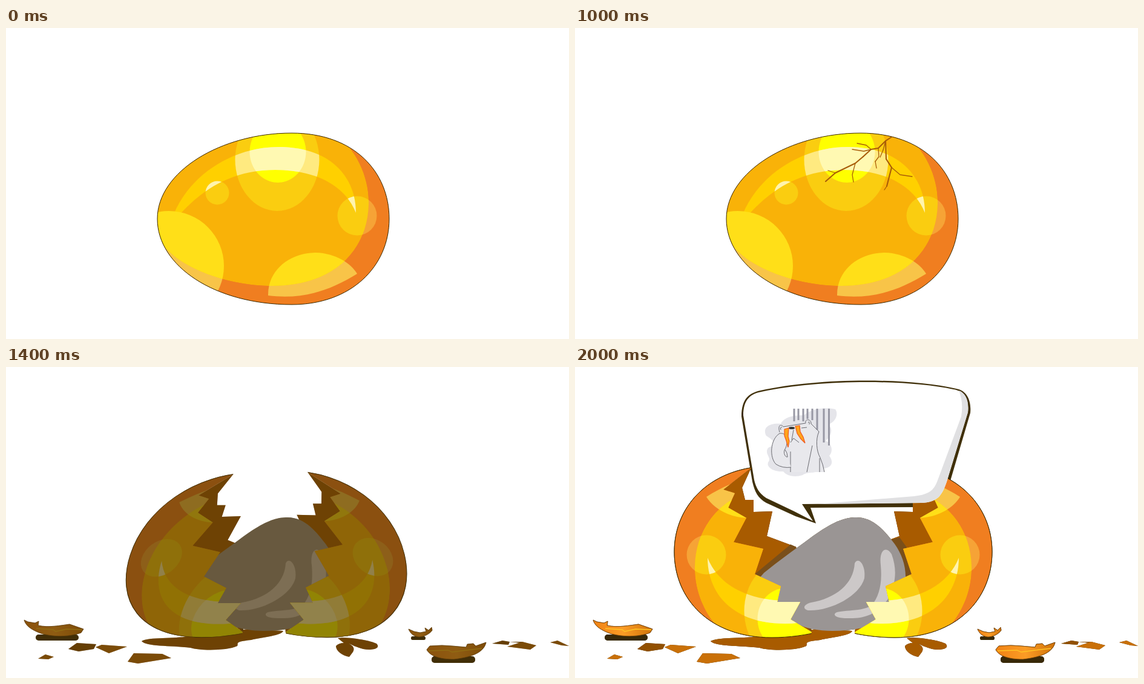
An HTML page that plays this animation: 930 px wide and 515 px high, repeating every 2.2 s.

```html
<!DOCTYPE html>
<html lang="en">
<head>
<meta charset="utf-8">
<title>Hatching egg</title>
<style>
html, body { margin: 0; width: 100%; height: 100%; overflow: hidden; background: #fff; }
svg { display: block; width: 100%; height: 100%; }
.crack path { fill: none; stroke: #a85c08; stroke-width: 1.3; stroke-linejoin: round; stroke-linecap: round; }
.crack .main { stroke-width: 2.1; }
.edge { fill: none; stroke: #3a2800; stroke-width: 1; }
</style>
</head>
<body>
<svg viewBox="0 0 930 515">
<defs>
  <filter id="silhouette" color-interpolation-filters="sRGB">
    <feFlood flood-color="#493207"/>
    <feComposite in2="SourceAlpha" operator="in"/>
  </filter>
  <linearGradient id="shard" x2="1">
    <stop offset="0" stop-color="#f08214"/><stop offset=".5" stop-color="#fb9c26"/><stop offset="1" stop-color="#cf7208"/>
  </linearGradient>

  <!-- painted egg -->
  <path id="eggShape" d="M250 316C250 238 355 174 472 174C575 174 633 238 633 316C633 395 570 458 472 458C345 458 250 394 250 316Z"/>
  <path id="eggLight" d="M565 195C590 225 600 262 599 292C597 370 540 427 440 427C365 427 290 397 262 362L200 300V150H540Z"/>
  <path id="eggBand" d="M270 330C290 250 370 197 450 197C540 197 578 250 578 306C560 260 510 235 445 235C370 235 315 270 270 330Z"/>
  <ellipse id="eggGlow" cx="448" cy="218" rx="69.5" ry="85"/>
  <ellipse id="eggCore" cx="449" cy="205" rx="46.5" ry="51"/>
  <g id="eggSpots">
    <circle cx="269" cy="394" r="91"/>
    <path d="M433 443C432 400 470 372 512 372C545 373 570 390 580 407C535 435 490 450 433 443Z"/>
  </g>
  <g id="eggDots"><circle cx="349" cy="273" r="19.5"/><circle cx="580" cy="311" r="32.5"/></g>
  <clipPath id="inEgg"><use href="#eggShape"/></clipPath>
  <clipPath id="inLight"><use href="#eggLight"/></clipPath>
  <clipPath id="inGlow"><use href="#eggGlow"/></clipPath>
  <clipPath id="inCore"><use href="#eggCore"/></clipPath>
  <clipPath id="inDots"><circle cx="349" cy="273" r="19.5"/><circle cx="580" cy="311" r="32.5"/></clipPath>
  <g id="paintedEgg">
    <g clip-path="url(#inEgg)">
      <path fill="#f07e20" d="M240 160H640V470H240Z"/>
      <use href="#eggSpots" fill="#f8c448"/>
      <use href="#eggDots" fill="#f6a336"/>
      <g clip-path="url(#inLight)">
        <use href="#eggLight" fill="#f9b208"/>
        <use href="#eggBand" fill="#ffd000"/>
        <use href="#eggGlow" fill="#facd10"/>
        <use href="#eggCore" fill="#ff0"/>
        <use href="#eggBand" fill="#ffea80" clip-path="url(#inGlow)"/>
        <use href="#eggBand" fill="#fff9b2" clip-path="url(#inCore)"/>
        <use href="#eggDots" fill="#facd10"/>
        <use href="#eggBand" fill="#fff4ae" clip-path="url(#inDots)"/>
        <use href="#eggSpots" fill="#ffdf18"/>
      </g>
    </g>
    <use href="#eggShape" class="edge"/>
  </g>

  <!-- left half of the broken shell: the egg turned upside down and cut; mirrored for the right half -->
  <clipPath id="jagged">
    <path d="M291 160V167L245 203 264 209 253 233 283 250 262 290 311 301 297 343 340 363 334 389 372 389 356 418 391 439V455H150V160Z"/>
  </clipPath>
  <path id="back" fill="#a85b00" d="M291 167L276 200 281 220H295V240L326 239 317 280 365 298 391 439 330 400 262 290 245 203Z"/>
  <g id="front" clip-path="url(#jagged)"><use href="#paintedEgg" transform="rotate(180 398.5 311)"/></g>

  <g id="scene">
    <g fill="#a85b00">
      <path d="M224 454C235 447 280 450 300 446L400 434 458 437C455 445 425 447 405 452C375 455 385 458 382 462C365 470 320 470 305 465C270 461 232 463 224 454Z"/>
      <path d="M548 449C560 446 600 452 612 458C620 466 605 470 590 467C578 464 572 460 566 458C575 462 576 467 573 472L567 480C555 478 545 470 545 462Q550 457 558 457Z"/>
      <path d="M103 467L117 457 149 459 145 467 120 471ZM803 458L820 453 832 455 830 460ZM832 455L853 455 852 457Z" fill="#925000"/>
      <path d="M148 464L158 460 200 463 170 474ZM53 483L65 476 79 480 70 484ZM201 488L211 474 258 475 273 482 218 491ZM828 463L853 455 876 461 866 468ZM899 456L911 453 930 462 918 461Z" fill="#c97008"/>
    </g>
    <g fill="#382908">
      <rect x="49" y="443" width="71" height="10" rx="5"/>
      <rect x="669" y="446" width="24" height="6" rx="3"/>
      <rect x="703" y="479" width="72" height="11" rx="5"/>
    </g>
    <g fill="url(#shard)" stroke="#7a4408" stroke-width=".8">
      <path d="M30 419L36 422 48 424 54 421 53 428C70 432 90 428 105 426L128 434 124 440C100 449 70 446 55 440C45 436 33 430 30 419Z"/>
      <path d="M665 434L674 438 684 440 694 438 692 432 698 436 703 431 704 436C700 442 690 447 682 447C673 446 668 441 665 434Z"/>
      <path d="M695 468L700 462 720 461 737 462 760 464 762 459 772 458 776 462 793 456C790 470 775 480 740 484C715 484 700 478 695 468Z"/>
      <path d="M50 433L78 435 82 438 100 434 126 435M698 470L730 469 737 472 760 469 786 466" fill="none" stroke="#ffc524" stroke-width="1.3"/>
    </g>
    <g class="left">
      <use href="#back"/><path fill="#7a4f1a" d="M356 294L365 298 391 439 297 343Z"/>
    </g>
    <g class="right">
      <use href="#back" transform="matrix(-1 0 0 1 853 0)"/><path fill="#7a4f1a" d="M522 286L536 282 549 300 557 342 530 370Z"/>
    </g>
    <path fill="#9a9594" d="M300 355L312 341C335 322 362 303 385 286C425 256 445 249 465 249C495 249 514 275 528 293C540 310 547 330 546 352C545 410 500 437 425 437C380 437 340 420 330 390Z"/>
    <g fill="#ccc8c8">
      <path d="M462 325C468 313 481 328 478 350C470 380 420 405 385 403C375 400 378 393 390 390C430 383 460 360 462 325Z"/>
      <path d="M429 409C432 401 470 407 490 395C502 380 508 360 505 328C502 303 514 295 523 310C532 335 530 355 520 380C500 410 480 417 450 416C435 416 428 413 429 409Z"/>
    </g>
    <g class="left"><use href="#front"/></g>
    <g class="right"><use href="#front" transform="matrix(-1 0 0 1 853 0)"/></g>
  </g>

  <g id="bubble">
    <path fill="#fff" d="M278 80C278 54 290 44 308 41C400 21 545 20 625 37C645 40 651 55 649 75L614 190C606 214 598 224 572 225L375 227 393 255 362 239 316 217C304 209 299 200 296 187Z"/>
    <path fill="#e0e0e2" d="M634 39C646 43 651 57 649 75L614 190C606 214 598 224 572 225L400 227 560 214C588 211 594 202 600 185L638 82Q642 58 634 39Z"/>
    <path fill="#e5e5ea" d="M316 114C308 98 325 92 340 94C346 82 362 80 378 80C390 68 416 66 430 70C436 78 430 92 418 95C428 103 422 116 414 122C426 128 426 141 420 147C428 158 424 166 412 168C400 178 385 172 376 179C364 183 350 181 344 173C328 174 316 166 319 158C326 150 312 144 319 134C332 128 330 122 316 114Z"/>
    <path fill="none" stroke="#9898a4" stroke-width="3" d="M362 69V90M369 69V88M377 69V90M384 69V86M392 69V88M400 69V104M411 69V125M419.5 69V130"/>
    <g fill="#e8e8ec" stroke="#6a6a70" stroke-width="1">
      <path stroke="none" d="M356 174V140L338 108 344 99 390 94C396 98 399 104 399 130Q409 154 412 174Z"/>
      <path fill="none" d="M356 174V140M338 108C334 94 342 95 344 99L381 93C379 85 391 86 390 94L403 107C397 120 399 140 405 150Q410 162 412 174"/>
      <path d="M338 110C322 120 321 150 332 161Q343 168 357 166M338 110C350 108 353 122 348 134C342 142 348 150 351 149Q351 142 347 137"/>
      <path fill="none" d="M392 130L383 174M404 151V174M340 104Q338 99 342 100M385 92Q388 89 387 95M361 104L358 121M356 125L361 118 370 125M374 101L383 100"/>
    </g>
    <ellipse cx="358" cy="101" rx="5" ry="2" fill="#333"/>
    <path fill="#ffa51c" stroke="#ef5a20" stroke-width="1.2" d="M346 103L353 101 352 115 354 123 352 133 349 122 346 114ZM364 98L371 97 372 107 377 116 380 126 373 119 367 110Z"/>
  </g>
</defs>

<g id="egg">
  <use href="#paintedEgg"/>
  <g class="crack"><path d="M522 181H523"/></g>
  <g class="crack"><path class="main" d="M522 181L513 187 501 199 495 200"/><path d="M513 187L509 202"/></g>
  <g class="crack">
    <path class="main" d="M495 200L489 201 476 213M513 187L514 217"/>
    <path d="M489 201L481 194 466 191M489 201L477 204 458 201M501 199L502 213 496 221M509 202L504 214M514 217L520 226"/>
  </g>
  <g class="crack">
    <path class="main" d="M476 213L463 224 430 240M514 217L523 231"/>
    <path d="M463 224L458 243 460 255M523 231L537 243 557 246M496 221L498 232"/>
  </g>
  <g class="crack"><path class="main" d="M430 240L414 254M523 231L515 262"/><path d="M430 240L418 236M515 262L511 268"/></g>
  <g class="crack">
    <path class="main" d="M414 254L403 263 396 276 404 285M515 262L525 273 528 305"/>
    <path d="M418 236L393 241M405 262L388 265M400 268L387 270M511 268L500 275 484 279M527 290L520 307M528 305V310M528 305L533 309 541 308 547 303 561 302"/>
  </g>
</g>
<g id="hatched">
  <path class="bubble" fill="#40300a" d="M275 82C275 52 288 43 306 39C400 18 545 17 630 36C648 39 655 57 653 76L621 185C613 213 600 231 575 232L389 233 398 259 364 247 316 225C302 217 297 207 293 190Z"/>
  <use href="#scene" filter="url(#silhouette)"/>
  <use id="sceneLayer" href="#scene"/>
  <use id="bubbleLayer" class="bubble" href="#bubble"/>
</g>
</svg>
<script>
const STEP = 200, STEPS = 11, HATCH = 7;
const byId = id => document.getElementById(id);
const all = selector => document.querySelectorAll(selector);
const show = (el, on) => el.setAttribute("display", on ? "inline" : "none");

// Leans a shell half about its bottom tip, at height 440.
const lean = (slant, height) =>
  `matrix(1 0 ${slant} ${height} ${-slant * 440} ${(1 - height) * 440})`;

function draw(step) {
  const stage = step - HATCH;
  show(byId("egg"), stage < 0);
  show(byId("hatched"), stage >= 0);
  all(".crack").forEach((crack, i) => show(crack, step > i));

  const closed = stage === 0;
  all(".left").forEach(el => el.setAttribute("transform", closed ? lean(-0.308, 0.96) : ""));
  all(".right").forEach(el => el.setAttribute("transform", closed ? lean(0.232, 0.972) : ""));
  byId("sceneLayer").setAttribute("opacity", [0.4, 0.72][stage] ?? 1);

  const rising = stage === 2;
  all(".bubble").forEach(el => {
    show(el, stage >= 2);
    el.setAttribute("transform", rising ? "translate(5 32.5)" : "");
  });
  byId("bubbleLayer").setAttribute("opacity", rising ? 0.53 : 1);
}

const start = performance.now();
let shown = -1;
function tick() {
  const step = Math.floor((performance.now() - start) / STEP) % STEPS;
  if (step !== shown) draw(shown = step);
  requestAnimationFrame(tick);
}
tick();
</script>
</body>
</html>
```
